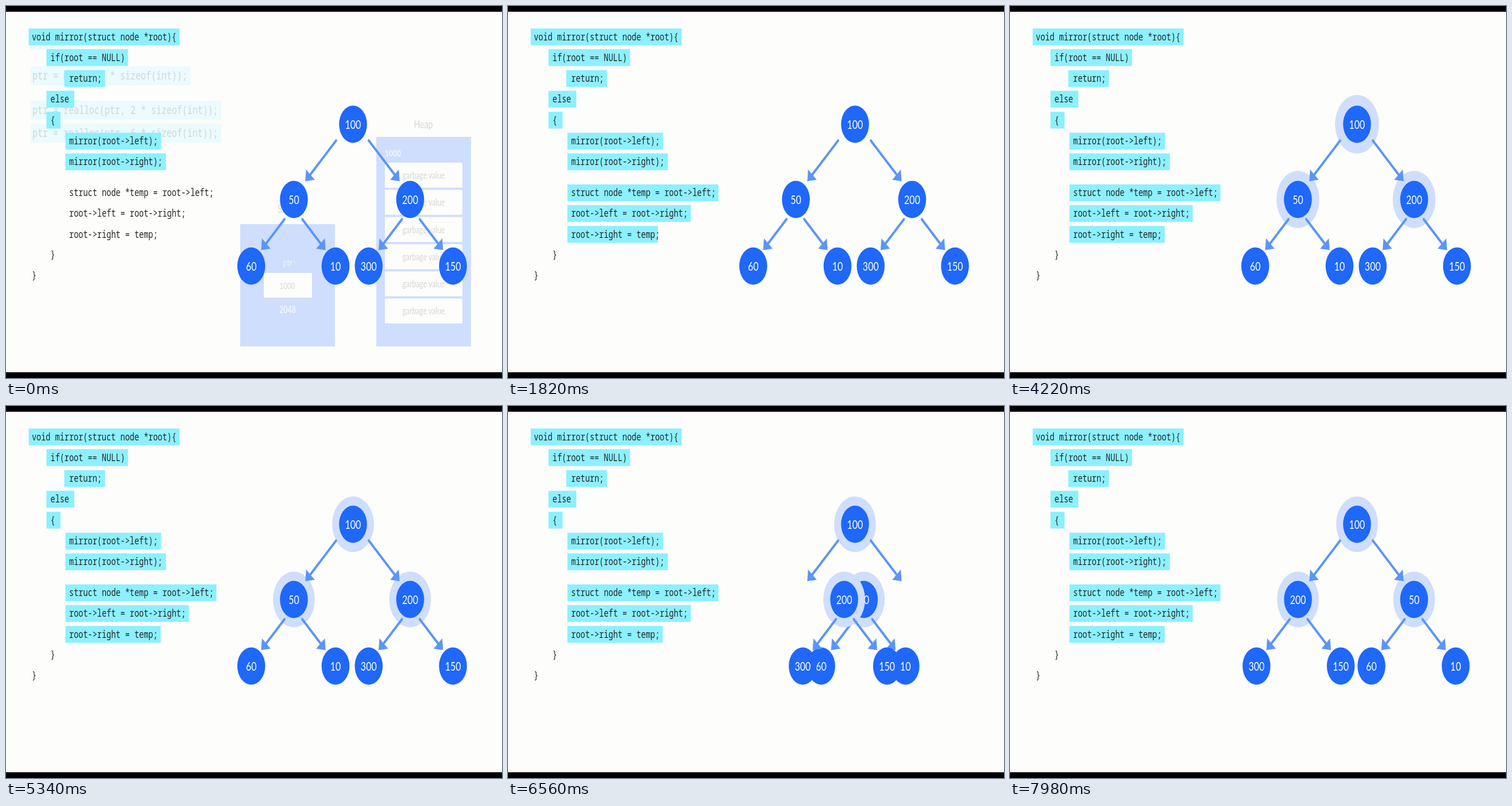
Animation, 864 px wide and 648 px high, one loop 8000 ms. Source, as an HTML page:

```html
<!DOCTYPE html>
<html lang="en">
<head>
<meta charset="utf-8">
<title>Mirror a binary tree</title>
<style>
  html, body { margin: 0; width: 100%; height: 100%; overflow: hidden; background: #000; }
  svg { display: block; width: 100vw; height: 100vh; }
  .mono { font-family: "Noto Sans Mono", "DejaVu Sans Mono", monospace; }
  .sans { font-family: Lato, "Open Sans", sans-serif; }
</style>
</head>
<body>
<svg id="stage" viewBox="0 0 864 648" preserveAspectRatio="none"></svg>
<script>
const NS = "http://www.w3.org/2000/svg";
const LOOP = 8000;
const K = 4 / 3; // the whole scene is a wide picture shown at 4:3
const BLUE = "#1f68f9", ARROW = "#5b96f7", HALO = "#cfdefc", CYAN = "#8cf0fe";
const stage = document.getElementById("stage");

function add(parent, tag, attrs = {}, text) {
  const el = document.createElementNS(NS, tag);
  for (const k in attrs) el.setAttribute(k, attrs[k]);
  if (text !== undefined) el.textContent = text;
  return parent.appendChild(el);
}
// Helpers take heights in stage pixels and undo the scene's stretch.
const box = (p, x1, y1, x2, y2, fill) =>
  add(p, "rect", { x: x1, y: y1 / K, width: x2 - x1, height: (y2 - y1) / K, fill });
const mono = (p, x, base, size, fill, text) =>
  add(p, "text", { x, y: base / K, "font-size": size, fill, class: "mono" }, text);
const label = (p, x, mid, size, fill, text, weight = 400) =>
  add(p, "text", { x, y: mid / K + size * 0.36, "font-size": size, fill, class: "sans",
    "font-weight": weight, "text-anchor": "middle" }, text);

add(stage, "rect", { width: 864, height: 648, fill: "#000" });
add(stage, "rect", { y: 10, width: 864, height: 628, fill: "#fdfdfb" });
const scene = add(stage, "g", { transform: `scale(1 ${K})` });

// Fading memory diagram
const ghost = add(scene, "g");
box(ghost, 42, 45, 130, 76, "#ebfbfe");
[[121, 321, "ptr = malloc(6 * sizeof(int));"],
 [181, 375, "ptr = realloc(ptr, 2 * sizeof(int));"],
 [221, 375, "ptr = realloc(ptr, 6 * sizeof(int));"]].forEach(([y, right, text]) => {
  box(ghost, 43, y - 16, right, y + 17, "#ebfbfe");
  mono(ghost, 46, y + 7, 15, "#d0d6d7", text);
});
label(ghost, 727, 206, 14.2, "#d6d6d6", "Heap");
box(ghost, 645, 228, 810, 593, HALO);
label(ghost, 674, 256, 12, "#f3f7fe", "1000", 700);
for (let i = 0; i < 6; i++) {
  const y = 273 + i * 47.3;
  box(ghost, 660, y, 795, y + 43.5, "#fdfdfb");
  label(ghost, 727.5, y + 22, 12.3, "#d6d6d2", "garbage value");
}
label(ghost, 490, 353, 14.2, "#d6d6d6", "Stack");
box(ghost, 408, 380, 573, 593, HALO);
label(ghost, 490.5, 447, 13, "#f3f7fe", "ptr");
box(ghost, 449, 465, 533, 508, "#fdfdfb");
label(ghost, 490, 487, 11.6, "#d6d6d2", "1000");
label(ghost, 490.5, 529, 12.4, "#f3f7fe", "2048", 700);

// Code: indent, row middle, text, highlight left and right, wipe start
const code = [
  [0, 54, "void mirror(struct node *root){", 39.5, 302.5],
  [4, 90, "if(root == NULL)", 70.5, 212.5],
  [8, 126.5, "return;", 101.5, 172.5],
  [4, 162.5, "else", 70.5, 119],
  [4, 199, "{", 70.5, 95],
  [8, 235.5, "mirror(root->left);", 103.5, 270],
  [8, 271.5, "mirror(root->right);", 103.5, 278.5],
  [8, 325.5, "struct node *temp = root->left;", 103.5, 366.5, 881],
  [8, 361.5, "root->left = root->right;", 103.5, 318.5, 1066],
  [8, 398, "root->right = temp;", 103.5, 269.5, 1251],
  [4, 433, "}"],
  [0, 469, "}"]
];
const wipes = [];
for (const [indent, y, text, left, right, start] of code) {
  if (left) {
    const el = box(scene, left, y - 14.8, right, y + 14.5, CYAN);
    if (start) wipes.push({ el, start, width: right - left });
  }
  mono(scene, 45 + indent * 8.13, y + 6, 13.55, "#262626", text);
}

// Tree
const halos = [];
function node(p, x, y, value, popAt) {
  if (popAt) {
    const el = add(p, "ellipse", { cx: x, cy: y / K, fill: HALO });
    halos.push({ el, popAt });
  }
  add(p, "circle", { cx: x, cy: y / K, r: 24.3, fill: BLUE });
  label(p, x, y, 16, "#fff", value);
}
function arrow(p, x1, y1, x2, y2) {
  const s = Math.sign(x1 - x2), b = y2 / K;
  add(p, "line", { x1, y1: y1 / K, x2: x2 + s * 7, y2: b - 7,
    stroke: ARROW, "stroke-width": 3.5, "stroke-linecap": "round" });
  add(p, "path", { d: `M${x2} ${b}l${s * 16.5} -2L${x2 + s * 1.5} ${b - 15.5}z`, fill: ARROW });
}
// The parent sits slightly off the middle of its children.
function subtree(mid, lean, value, left, right) {
  const g = add(scene, "g");
  node(g, mid + lean, 337, value, 3790);
  [[-1, left], [1, right]].forEach(([side, child]) => node(g, mid + side * 73.4, 453, child));
  for (const side of [-1, 1]) arrow(g, mid + side * 15.5, 371.5, mid + side * 56.2, 425.3);
  return g;
}
node(scene, 604.5, 206, "100", 3830);
const fifty = subtree(500.6, 0.9, "50", "60", "10");
const twoHundred = subtree(705.2, -1.2, "200", "300", "150");
arrow(scene, 575, 234.5, 521.3, 305.3);
arrow(scene, 632, 234.5, 685.7, 305.3);

const clamp = v => Math.min(1, Math.max(0, v));
const backOut = u => 1 + 2.70158 * (u - 1) ** 3 + 1.70158 * (u - 1) ** 2;
function backInOut(u) {
  const c = 2.35;
  const half = v => v * v * ((c + 1) * v - c) / 2;
  return u < 0.5 ? half(2 * u) : 1 - half(2 - 2 * u);
}

function draw(t) {
  ghost.setAttribute("opacity", 1 - clamp((t - 20) / 160));
  for (const w of wipes)
    w.el.setAttribute("width", w.width * clamp((t - w.start) / 600));
  for (const h of halos) {
    const r = Math.max(0, 36.4 * backOut(clamp((t - h.popAt) / 500)));
    h.el.setAttribute("rx", r);
    h.el.setAttribute("ry", r);
  }
  const shift = 202.4 * backInOut(clamp((t - 5848) / 1380));
  fifty.setAttribute("transform", `translate(${shift} 0)`);
  twoHundred.setAttribute("transform", `translate(${-shift} 0)`);
}

const begin = performance.now();
function tick() {
  draw((performance.now() - begin) % LOOP);
  requestAnimationFrame(tick);
}
draw(0);
requestAnimationFrame(tick);
</script>
</body>
</html>
```
